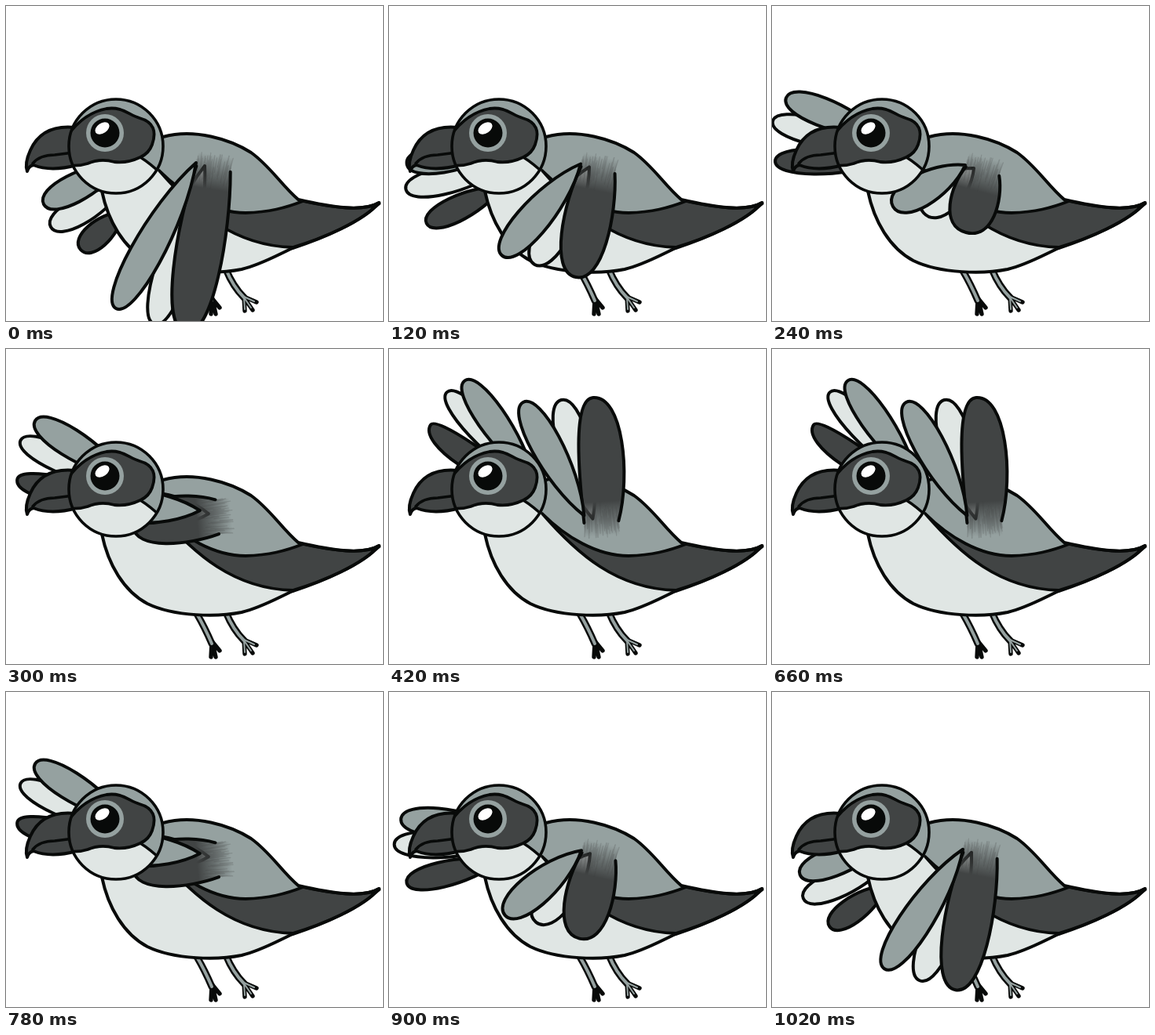
Recreate the animation shown at these times as an HTML page with a canvas. Size 480x402 px, loop 1080 ms.

```html
<!DOCTYPE html>
<html lang="en">
<head>
<meta charset="utf-8">
<title>Flapping bird</title>
<style>
html, body { margin: 0; width: 100%; height: 100%; overflow: hidden; background: #fff; }
canvas { display: block; width: 480px; height: 402px; }
</style>
</head>
<body>
<canvas id="stage"></canvas>
<script>
const W = 480, H = 402, STEP = 60, STEPS = 18, SIDE = 4, TOP = 9;
const INK = '#080a09', GREY = '#95a1a0', DARK = '#414444', PALE = '#e0e6e4';
const TAU = Math.PI * 2;
const canvas = document.getElementById('stage');
const ctx = canvas.getContext('2d');
const dpr = window.devicePixelRatio || 1;
canvas.width = W * dpr;
canvas.height = H * dpr;
ctx.scale(dpr, dpr);
ctx.lineCap = ctx.lineJoin = 'round';

const mix = (a, b, f) => a + (b - a) * f;
const easeOut = (f, p) => 1 - (1 - f) ** p;

// Roots and tips are given for the wing held down, sideways and up.
const far = {
  roots: [[150, 200], [140, 165], [217, 171]],
  gap: u => [0, 31 * (1 - u)],
  swing: () => 0.9,
  slim: 0,
  feathers: {
    grey: { color: GREY, order: 0, width: 36, tips: [[48, 253], [18, 117], [191, 3]] },
    pale: { color: PALE, order: 1, width: 34, tips: [[57, 282], [1, 147], [164, 3]] },
    dark: { color: DARK, order: 2, width: 32, bend: -20, tips: [[95, 311], [4, 198], [126, 27]] }
  }
};
const near = {
  roots: [[242, 200], [246, 203], [250, 219]],
  gap: () => [11, 4],
  swing: order => 1.3 + 0.35 * order,
  slim: 0.15,
  feathers: {
    grey: { color: GREY, order: 0, width: 41, tips: [[140, 386], [154, 256], [290, 28]] },
    pale: { color: PALE, order: 1, width: 43, tips: [[189, 406], [193, 264], [322, 38]] },
    dark: { color: DARK, order: 2, width: 58, bend: 14, tips: [[229, 416], [247, 289], [363, 48]] }
  }
};

// Rotates and stretches a feather between two neighbouring wing positions.
function pose(wing, feather, step) {
  const rising = step >= SIDE, i = rising ? 1 : 0;
  const f = rising ? (step - SIDE) / (TOP - SIDE) : step / SIDE;
  const turn = rising ? easeOut(f, wing.swing(feather.order)) : f ** 1.4;
  const reach = easeOut(f, 1.15), up = rising ? f : 0;
  const ends = [i, i + 1].map(n => {
    const [gx, gy] = wing.gap([0, SIDE, TOP][n] / TOP);
    const x = wing.roots[n][0] + gx * feather.order;
    const y = wing.roots[n][1] + gy * feather.order;
    const dx = feather.tips[n][0] - x, dy = feather.tips[n][1] - y;
    return { x, y, angle: (Math.atan2(dy, dx) + TAU) % TAU, len: Math.hypot(dx, dy) };
  });
  const [a, b] = ends;
  return {
    x: mix(a.x, b.x, f),
    y: mix(a.y, b.y, f),
    angle: mix(a.angle, b.angle, turn),
    len: mix(a.len, b.len, reach),
    width: feather.width * (1 - wing.slim * up * up),
    bend: (feather.bend || 0) * up
  };
}

// Traces a lobe along the x axis, with an optional wide open root.
function lobe({ len, width, bend }, root = 0, back = 0) {
  const k = (width / 2 - root / 8) / 0.75;
  ctx.beginPath();
  ctx.moveTo(-back, -root);
  ctx.lineTo(0, -root);
  ctx.bezierCurveTo(len * 0.36, bend - k, len, bend * 0.6 - k, len, 0);
  ctx.bezierCurveTo(len, bend * 0.6 + k, len * 0.36, bend + k, 0, root);
  ctx.lineTo(-back, root);
}

function drawFeather(wing, name, step, trace) {
  const feather = wing.feathers[name], p = pose(wing, feather, step);
  ctx.save();
  ctx.translate(p.x, p.y);
  ctx.rotate(p.angle);
  if (trace) {
    trace(p);
  } else {
    lobe(p);
    paint(feather.color, 4);
  }
  ctx.restore();
}

function seeded(seed) {
  return () => (seed = (seed * 16807) % 2147483647) / 2147483647;
}

// The dark near feather melts into the shoulder.
function smoky(p) {
  const root = 22, rnd = seeded(77);
  const fade = ctx.createLinearGradient(-18, 0, 26, 0);
  fade.addColorStop(0, 'rgba(65,68,68,0)');
  fade.addColorStop(0.5, 'rgba(65,68,68,.55)');
  fade.addColorStop(1, DARK);
  lobe(p, root, 18);
  paint(fade, 0);
  ctx.beginPath();
  for (let i = 0; i < 46; i++) {
    const v = (rnd() * 2 - 1) * (root - 1), s = -20 + rnd() * 18;
    ctx.moveTo(s, v * 1.08);
    ctx.lineTo(s + 16 + rnd() * 12, v);
  }
  ctx.lineWidth = 1.2;
  ctx.strokeStyle = 'rgba(60,62,62,.2)';
  ctx.stroke();
  lobe(p, root);
  paint(null, 4);
}

function paint(fill, line = 3.8) {
  if (fill) { ctx.fillStyle = fill; ctx.fill(); }
  if (line) { ctx.lineWidth = line; ctx.strokeStyle = INK; ctx.stroke(); }
}

function shape(d, fill, line = 3.8) {
  const p = new Path2D(d);
  if (fill) { ctx.fillStyle = fill; ctx.fill(p); }
  if (line) { ctx.lineWidth = line; ctx.strokeStyle = INK; ctx.stroke(p); }
}

function disc(x, y, r, fill, line = 0) {
  ctx.beginPath();
  ctx.arc(x, y, r, 0, TAU);
  paint(fill, line);
}

function line(d, width, color = INK) {
  ctx.lineWidth = width;
  ctx.strokeStyle = color;
  ctx.stroke(new Path2D(d));
}

function drawLegs() {
  const legs = 'M243 338 Q253 355 262 376 M280 336 Q289 358 303 372';
  const toes = 'M262 375 L261 393 M263 375 L267 393 M263 374 L272 385 ' +
    'M303 372 L304 389 M303 372 L314 388 M303 371 L319 378';
  line(legs, 9);
  line(toes, 5.4);
  line(legs, 4, GREY);
  line('M303 372 L304 387 M303 372 L312 385 M303 371 L316 377', 2, GREY);
}

function drawBody() {
  const back = 'C350 228 337 205 312 187 C285 170 240 156 200 167 ';
  const seam = 'M195 210 C225 240 265 264 305 264 C335 263 355 258 378 249 ';
  const outline = 'M122 236 C130 275 150 309 180 325 C215 342 270 342 300 336 ' +
    'C325 330 345 318 365 309 C402 297 455 275 475 251 C455 263 415 257 372 247 ' +
    back + 'Z';
  shape(outline, PALE, 0);
  shape(seam + back + 'L172 192 Z', GREY, 0);
  shape(seam + 'C415 257 455 263 475 251 C455 275 402 297 365 308 ' +
    'C290 306 240 262 195 210 Z', DARK);
  shape(outline, null, 4);
  line('M467 258 L475 252', 4.5);
}

function drawHead() {
  shape('M88 155 C58 152 40 164 31 184 C26 195 24 203 27 211 Q29 204 35 203 ' +
    'C50 209 68 209 90 203 Z', DARK, 4);
  line('M34 201 Q43 190 62 190 L86 187', 3.6);

  disc(140, 179, 60, GREY);
  ctx.save();
  ctx.clip();
  shape('M70 202 L105 201 L172 193 L202 218 L190 250 L80 250 Z', PALE, 0);
  line('M171 193 Q184 201 203 219', 3.4);
  shape('M74 172 Q96 137 128 131 C148 128 156 139 170 143 C188 148 192 160 186 177 ' +
    'Q182 188 171 193 Q154 201 138 199 Q120 194 104 201 Q92 205 76 203 Z', DARK);
  ctx.restore();
  disc(140, 179, 60, null, 3.6);

  disc(126, 162, 24, GREY);
  disc(126, 162, 18.5, INK);
  ctx.beginPath();
  ctx.ellipse(122.5, 156, 10, 6.5, -0.6, 0, TAU);
  paint('#fff', 0);
}

function draw(step) {
  ctx.fillStyle = '#fff';
  ctx.fillRect(0, 0, W, H);
  for (const name of ['pale', 'dark', 'grey']) drawFeather(far, name, step);
  drawLegs();
  drawBody();
  drawFeather(near, 'pale', step);
  drawFeather(near, 'dark', step, smoky);
  drawFeather(near, 'grey', step);
  drawHead();
}

const start = performance.now();
function tick() {
  const n = Math.floor((performance.now() - start) / STEP) % STEPS;
  draw(Math.min(n, STEPS - n));
  requestAnimationFrame(tick);
}
tick();
</script>
</body>
</html>
```
